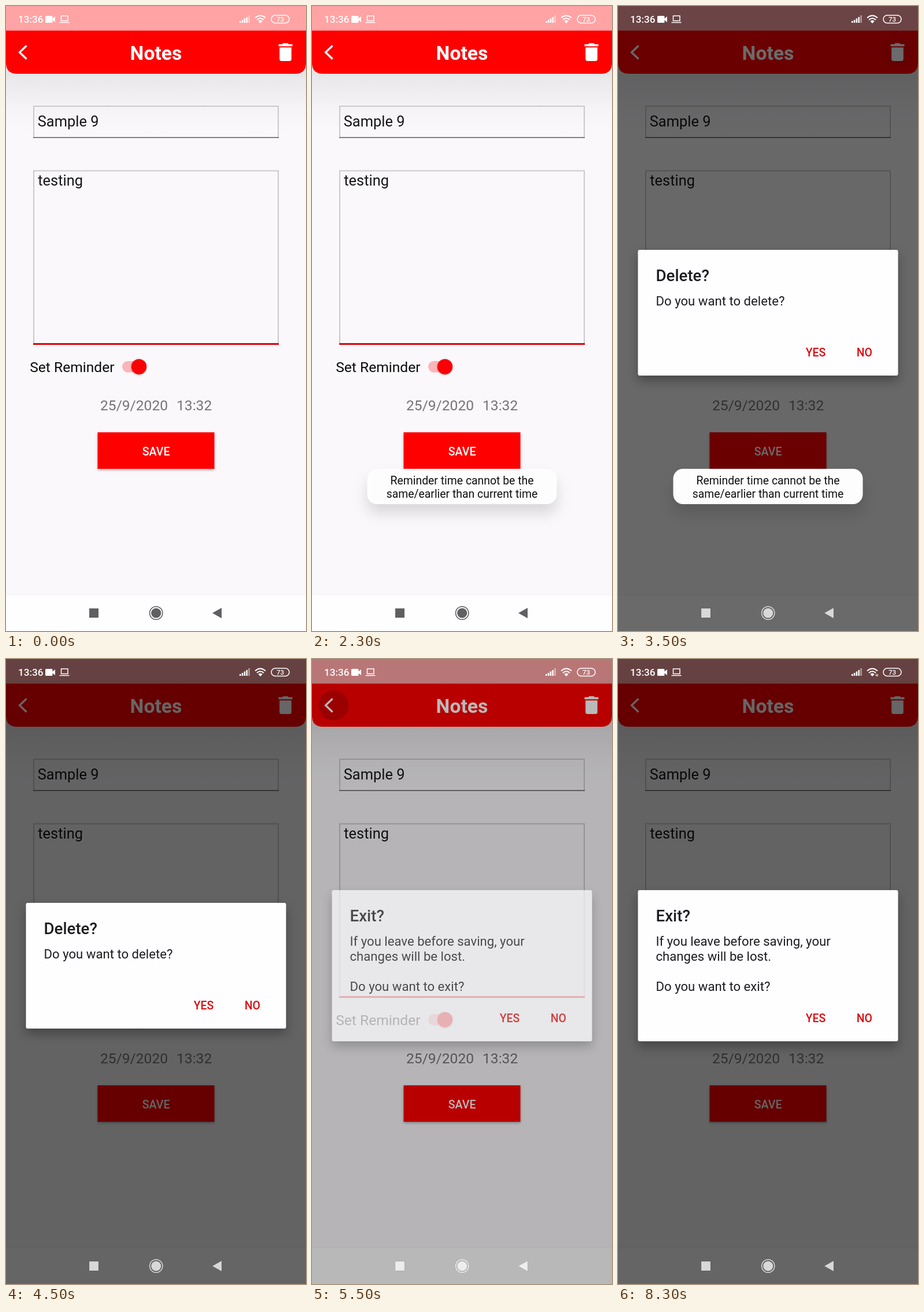
Write an HTML page that moves like this. It is 519 px wide and 1079 px high and loops after 8.4 s.

```html
<!DOCTYPE html>
<html lang="en">
<head>
<meta charset="utf-8">
<title>Notes</title>
<style>
  html, body { margin: 0; width: 100%; height: 100%; overflow: hidden; background: #faf8fb; }
  svg { display: block; width: 100%; height: 100%; }
  text { font-family: Roboto, "Noto Sans", sans-serif; white-space: pre; }
  .medium { font-weight: 500; }
  .mid { text-anchor: middle; }
  .field { fill: none; stroke: #cbc9cc; stroke-width: 2; }
  .input { font-size: 25.4px; fill: #151417; }
  .label { font-size: 24.6px; fill: #0c0b0d; }
  .date { font-size: 24.6px; fill: #757378; }
  .button { filter: drop-shadow(0 2px 2px rgba(0,0,0,.3)); }
  .thumb { filter: drop-shadow(0 1.5px 1.5px rgba(0,0,0,.3)); }
  .card { fill: #fefdff; filter: drop-shadow(0 9px 9px rgba(0,0,0,.3)); }
  .title { font-size: 27.7px; font-weight: 500; fill: #1c1b1d; }
  .body { font-size: 22.15px; fill: #1c1b1d; }
  .action { font-size: 19.4px; font-weight: 500; fill: #dc0a0c; }
  .toast-card { fill: #fefdfe; filter: drop-shadow(0 16px 12px rgba(0,0,0,.13)); }
  .toast-text { font-size: 19.4px; fill: #111; }

  .anim { opacity: 0; animation: 8400ms step-end -10ms infinite; }
  #caret { animation-name: caret; }
  #save-press { animation-name: save-press; }
  #toast { animation-name: toast; }
  #trash-press { animation-name: trash-press; }
  #back-press { animation-name: back-press; }
  #dim { animation-name: dim; }
  #delete { animation-name: delete; }
  #exit { animation-name: exit; }
  #nav-dark { animation-name: nav-dark; }
  #nav-light { animation-name: nav-light; }
  #traffic { animation-name: traffic; }

  @keyframes caret {
    0%, 15.476%, 27.381%, 38.095%, 61.905%, 100% { opacity: 0; }
    9.524%, 21.429%, 33.333%, 55.952% { opacity: 1; }
  }
  @keyframes save-press {
    0%, 21.429%, 100% { opacity: 0; }
    16.667% { opacity: .5; }
    17.857% { opacity: 1; }
    20.238% { opacity: .4; }
  }
  @keyframes toast {
    0%, 44.048%, 100% { opacity: 0; }
    17.857% { opacity: .4; }
    19.048% { opacity: 1; }
    42.857% { opacity: .5; }
  }
  @keyframes trash-press {
    0%, 42.857%, 100% { opacity: 0; }
    36.905% { opacity: .4; }
    38.095% { opacity: 1; }
    40.476% { opacity: .7; }
    41.667% { opacity: .3; }
  }
  @keyframes back-press {
    0%, 69.048%, 100% { opacity: 0; }
    63.095% { opacity: .4; }
    64.286% { opacity: 1; }
    66.667% { opacity: .7; }
    67.857% { opacity: .3; }
  }
  @keyframes dim {
    0%, 55.952%, 100% { opacity: 0; }
    39.286% { opacity: .07; }
    40.476% { opacity: .36; }
    41.667% { opacity: .58; }
    42.857% { opacity: .6; }
    54.762% { opacity: .3; }
    64.286% { opacity: .03; }
    65.476% { opacity: .275; }
    66.667% { opacity: .55; }
    67.857% { opacity: .6; }
  }
  @keyframes delete {
    0%, 55.952%, 100% { opacity: 0; }
    39.286% { opacity: .24; }
    40.476% { opacity: .85; }
    41.667% { opacity: 1; }
    54.762% { opacity: .35; }
  }
  @keyframes exit {
    0%, 100% { opacity: 0; }
    64.286% { opacity: .05; }
    65.476% { opacity: .7; }
    66.667% { opacity: 1; }
  }
  @keyframes nav-dark {
    0%, 55.952%, 100% { opacity: 1; }
    39.286%, 65.476% { opacity: 0; }
  }
  @keyframes nav-light {
    0%, 55.952%, 100% { opacity: 0; }
    39.286%, 65.476% { opacity: 1; }
  }
  @keyframes traffic {
    0%, 100% { opacity: 0; }
    96.429% { opacity: 1; }
  }
</style>
</head>
<body>
<svg viewBox="0 0 519 1079" preserveAspectRatio="none">
  <defs>
    <linearGradient id="shade" x1="0" y1="0" x2="0" y2="1">
      <stop offset="0" stop-opacity=".1"/>
      <stop offset=".28" stop-opacity=".06"/>
      <stop offset=".65" stop-opacity=".02"/>
      <stop offset="1" stop-opacity="0"/>
    </linearGradient>
    <g id="keys">
      <rect x="144" y="1040" width="16" height="16"/>
      <circle cx="259.7" cy="1048" r="8.6"/>
      <path d="M357 1048L373 1039V1057Z"/>
    </g>
  </defs>

  <rect width="519" height="1079" fill="#faf8fb"/>
  <rect y="98" width="519" height="118" fill="url(#shade)"/>

  <!-- header -->
  <rect width="519" height="43" fill="#ffa3a4"/>
  <path d="M0 42.5H519V98Q519 117 500 117H19Q0 117 0 98Z" fill="#f00"/>
  <g fill="#000" fill-opacity=".16">
    <circle id="trash-press" class="anim" cx="483.5" cy="80" r="26"/>
    <circle id="back-press" class="anim" cx="37.5" cy="80" r="26"/>
  </g>
  <path d="M35.5 68.5L23.5 80L35.5 91.5" fill="none" stroke="#fff" stroke-width="3.2"/>
  <text class="mid" x="259.5" y="93" font-size="33.7" font-weight="700" fill="#fff">Notes</text>
  <path d="M471.5 66H478L479.5 64.2H487.500L489 66H495.500V69.600H471.500ZM473.200 71.500H493.800V91.500Q493.800 95 490.300 95H476.700Q473.200 95 473.200 91.500Z" fill="#fff"/>

  <!-- form -->
  <path class="field" d="M48 227V173H471V227"/>
  <path d="M47 227.200H472" stroke="#737177" stroke-width="1.700"/>
  <text class="input" x="54.800" y="208">Sample 9</text>

  <path class="field" d="M48 583V284.500H471V583"/>
  <path d="M47 583.500H472" stroke="#e00009" stroke-width="3"/>
  <text class="input" x="55.300" y="310">testing</text>
  <rect id="caret" class="anim" x="132.200" y="284" width="2.800" height="33" fill="#e00009"/>

  <text class="label" x="41.200" y="632">Set Reminder</text>
  <rect x="201" y="613" width="40" height="19.500" rx="9.700" fill="#fbb5b8"/>
  <circle class="thumb" cx="230" cy="622.700" r="13.200" fill="#fa0006"/>

  <text class="date" x="163" y="698">25/9/2020</text>
  <text class="date" x="295" y="698">13:32</text>

  <rect class="button" x="158.500" y="736" width="202" height="63" fill="#f00"/>
  <rect id="save-press" class="anim" x="158.500" y="736" width="202" height="63" fill="#fff" fill-opacity=".2"/>
  <text class="mid medium" x="259.700" y="775.500" font-size="19.600" fill="#fff">SAVE</text>

  <rect y="1017" width="519" height="62" fill="#fefdff"/>
  <path d="M0 1016.500H519" stroke="#f1eff2"/>

  <rect id="dim" class="anim" width="519" height="1079"/>

  <!-- navigation keys -->
  <g id="nav-dark" class="anim" fill="#606063">
    <use href="#keys"/>
    <circle cx="259.700" cy="1048" r="11.200" fill="none" stroke="#606063" stroke-width="1.500"/>
  </g>
  <g id="nav-light" class="anim">
    <use href="#keys" fill="#fff" fill-opacity=".75" stroke="#000" stroke-opacity=".08"/>
    <circle cx="259.700" cy="1048" r="11.200" fill="none" stroke="#fff" stroke-opacity=".75" stroke-width="1.500"/>
    <circle cx="259.700" cy="1048" r="12.200" fill="none" stroke="#000" stroke-opacity=".06"/>
  </g>

  <!-- status icons -->
  <g fill="#fff">
    <text class="medium" x="21" y="29" font-size="17.200">13:36</text>
    <rect x="68" y="17" width="12.500" height="12" rx="1.500"/>
    <path d="M80 22L85 18V28L80 24Z"/>
    <path d="M95.500 25.500V17H107V25.500ZM92.500 28.500H109.500" fill="none" stroke="#fff" stroke-width="1.500"/>
    <path d="M404 26h2.500v3h-2.500zM407.800 24h2.500v5h-2.500zM411.600 21.500h2.500v7.500h-2.500zM415.400 19h2.500v10h-2.500z"/>
    <path d="M419.200 16h2.500v13h-2.500z" opacity=".5"/>
    <g fill="none" stroke="#fff" stroke-width="2">
      <path d="M431 20.500Q440 12.500 449 20.500M434 24Q440 18.500 446 24"/>
      <rect x="459" y="16" width="31" height="13.500" rx="6.700" stroke-width="1.500"/>
    </g>
    <path d="M436.300 26.200Q440 23 443.700 26.200L440 30Z"/>
    <path id="traffic" class="anim" d="M446 26h1.200v4h-1.200zM448.500 26h1.200v4h-1.200z"/>
    <text class="mid medium" x="474.500" y="27" font-size="11.500">73</text>
  </g>

  <!-- dialogs -->
  <g id="delete" class="anim">
    <rect class="card" x="34.500" y="421" width="450" height="217" rx="3"/>
    <text class="title" x="65.500" y="474.500">Delete?</text>
    <text class="body" x="65.500" y="516.500">Do you want to delete?</text>
    <text class="action mid" x="342" y="605">YES</text>
    <text class="action mid" x="426.300" y="605">NO</text>
  </g>
  <g id="exit" class="anim">
    <rect class="card" x="34.500" y="399" width="450" height="261" rx="3"/>
    <text class="title" x="65.500" y="452.500">Exit?</text>
    <text class="body" x="65.500" y="494.500">If you leave before saving, your</text>
    <text class="body" x="65.500" y="520.500">changes will be lost.</text>
    <text class="body" x="65.500" y="572.500">Do you want to exit?</text>
    <text class="action mid" x="342" y="627">YES</text>
    <text class="action mid" x="426.300" y="627">NO</text>
  </g>

  <g id="toast" class="anim">
    <rect class="toast-card" x="95.500" y="799" width="328" height="61" rx="17"/>
    <text class="toast-text mid" x="259.500" y="826">Reminder time cannot be the</text>
    <text class="toast-text mid" x="259.500" y="849">same/earlier than current time</text>
  </g>
</svg>
</body>
</html>
```
